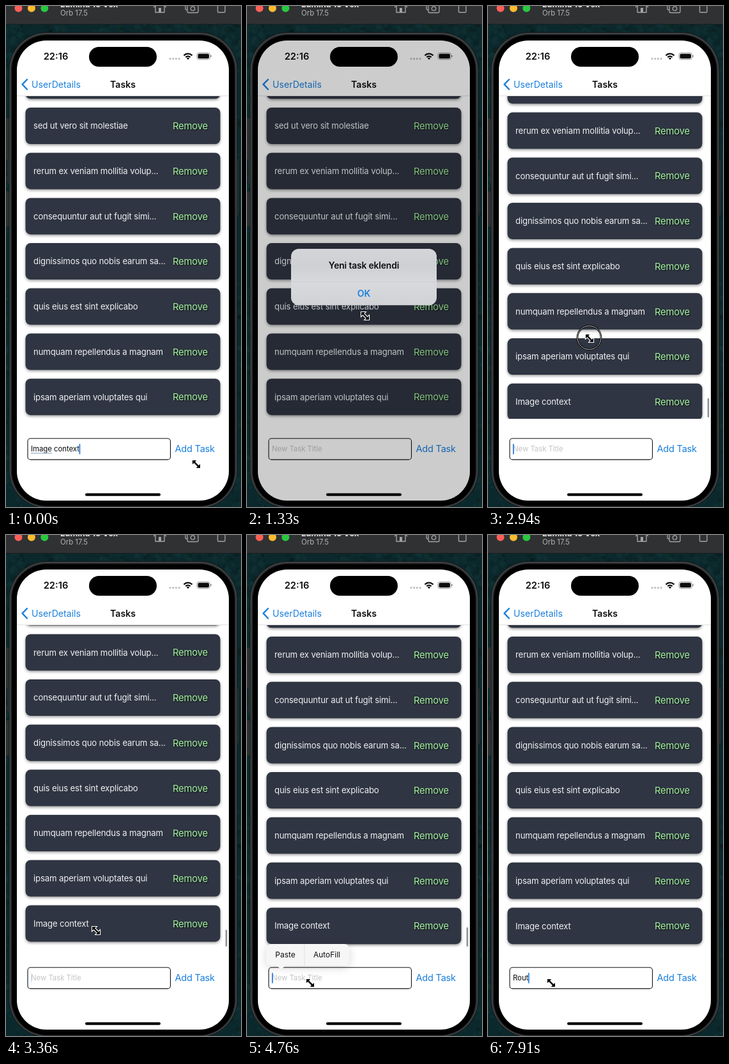
Animation of 368x784 px, one loop 8 s. Source, as an HTML page with a canvas:

```html
<!DOCTYPE html>
<html lang="en">
<head>
<meta charset="utf-8">
<title>Task list</title>
<style>
html, body { margin: 0; width: 100%; height: 100%; overflow: hidden; background: #0d2a2e; }
canvas { display: block; width: 368px; height: 784px; }
</style>
</head>
<body>
<canvas id="stage"></canvas>
<script>
const W = 368, H = 784, LOOP = 8000;
const PITCH = 70.7, LIST_TOP = 141, LIST_END = 646;
const BLUE = '#1a7fdc', INK = '#0c0d0f';
const TASKS = ['sed ut vero sit molestiae', 'rerum ex veniam mollitia volup...',
  'consequuntur aut ut fugit simi...', 'dignissimos quo nobis earum sa...',
  'quis eius est sint explicabo', 'numquam repellendus a magnam',
  'ipsam aperiam voluptates qui', 'Image context'];

// time, x, y
const POINTER = [[0, 298, 717], [300, 297, 700], [860, 297, 699], [1330, 185, 485],
  [1600, 183, 457], [2100, 183, 457], [2520, 166, 586], [2600, 165, 586], [2940, 159, 520],
  [3010, 158, 512], [3360, 141, 619], [3900, 111, 711], [4200, 111, 711], [4340, 99, 701]];

const canvas = document.getElementById('stage');
const dpr = window.devicePixelRatio || 1;
canvas.width = W * dpr;
canvas.height = H * dpr;
let ctx = canvas.getContext('2d');

const clamp = v => Math.max(0, Math.min(1, v));
const lerp = (a, b, k) => a + (b - a) * k;
const smooth = k => k * k * (3 - 2 * k);
const ramp = (t, from, to) => smooth(clamp((t - from) / (to - from)));
const pulse = (t, a, b, c, d) => ramp(t, a, b) * (1 - ramp(t, c, d));

function box(x, y, w, h, r, fill) {
  ctx.beginPath();
  ctx.roundRect(x, y, w, h, r);
  if (fill) {
    ctx.fillStyle = fill;
    ctx.fill();
  }
}

function disc(x, y, r, fill) {
  ctx.beginPath();
  ctx.arc(x, y, r, 0, 7);
  ctx.fillStyle = fill;
  ctx.fill();
}

function shape(points, close) {
  ctx.beginPath();
  points.forEach(([x, y]) => ctx.lineTo(x, y));
  if (close) ctx.closePath();
}

function stroke(color, width) {
  ctx.strokeStyle = color;
  ctx.lineWidth = width;
  ctx.stroke();
}

function text(s, x, y, size, color, { weight = 400, gap = 0, align = 'left' } = {}) {
  ctx.font = `${weight} ${size}px Inter, Roboto, sans-serif`;
  ctx.letterSpacing = gap + 'px';
  ctx.textAlign = align;
  ctx.fillStyle = color;
  ctx.fillText(s, x, y);
}

function shadow(color, blur, dx, dy) {
  ctx.shadowColor = color;
  ctx.shadowBlur = blur * dpr;
  ctx.shadowOffsetX = dx * dpr;
  ctx.shadowOffsetY = dy * dpr;
}

function layer(alpha, draw) {
  if (alpha <= 0) return;
  ctx.save();
  ctx.globalAlpha = alpha;
  draw();
  ctx.restore();
}

function random(seed) {
  return () => (seed = (seed * 16807) % 2147483647) / 2147483647;
}

function forest() {
  ctx.fillStyle = '#0b292d';
  ctx.fillRect(0, 0, W, H);
  const rnd = random(71);
  for (let i = 0; i < 900; i++) {
    const edge = i % 3;
    const x = edge ? (edge === 1 ? rnd() * 30 : W - rnd() * 30) : rnd() * W;
    const y = edge ? 28 + rnd() * 756 : 28 + rnd() * 40;
    const l = 6 + rnd() * 11;
    disc(x, y, 1.5 + rnd() * 4, `hsla(${170 + rnd() * 20}, 50%, ${l}%, .4)`);
  }
  ctx.fillStyle = 'rgba(58,52,47,.7)';
  ctx.fillRect(0, 176, 5, 64);
  ctx.fillRect(0, 290, 5, 55);
}

function toolbar() {
  ctx.fillStyle = '#303133';
  ctx.fillRect(0, 0, W, 28);
  ctx.fillStyle = '#1b1e1f';
  ctx.fillRect(0, 28, W, 1);
  ['#fe5f57', '#febc2e', '#28c840'].forEach((c, i) => disc(19.5 + i * 20.4, 3.5, 6, c));
  text('Lumina 15 Vex', 85, 2, 13, '#e6e6e6', { weight: 700 });
  text('Orb 17.5', 85, 15.3, 11.4, '#b2b3b4');
  const c = '#a3a4a5';
  ctx.lineJoin = 'round';
  shape([[231, 2], [241, -7], [251, 2]]);
  stroke(c, 1.4);
  shape([[234, 0], [234, 10], [248, 10], [248, 0]]);
  stroke(c, 1.4);
  box(239, 3, 4, 7, 0, c);
  box(281, -7, 15, 13, 2);
  stroke(c, 1.3);
  box(284, -3, 17, 13.5, 2, '#303133');
  stroke(c, 1.3);
  ctx.beginPath();
  ctx.arc(292.5, 4, 3.2, 0, 7);
  stroke(c, 1.3);
  box(331.5, -5, 11.5, 15, 1.5);
  stroke(c, 1.4);
}

function shell() {
  const button = '#2f3234';
  box(2.5, 176, 4, 25, 1, button);
  box(2.5, 226, 4, 52, 1, button);
  box(2.5, 292, 4, 52, 1, button);
  box(360, 240, 4, 88, 1, button);
  box(4.5, 41, 358, 745, 59, '#141617');
  box(5.5, 42, 356, 743, 58, '#404244');
  box(7.5, 44, 352, 739.5, 56, '#222426');
  box(9, 45.5, 349, 737, 55, '#000');
}

// Everything behind the app is drawn once.
const backdrop = document.createElement('canvas');
backdrop.width = canvas.width;
backdrop.height = canvas.height;
{
  const main = ctx;
  ctx = backdrop.getContext('2d');
  ctx.scale(dpr, dpr);
  forest();
  toolbar();
  shell();
  ctx = main;
}

function statusBar() {
  text('22:16', 78, 84, 14.7, INK, { weight: 600, align: 'center' });
  for (let i = 0; i < 4; i++) disc(257 + i * 4.7, 82.6, 1.5, '#b9babc');
  ctx.lineCap = 'butt';
  for (const r of [4.9, 8.9]) {
    ctx.beginPath();
    ctx.arc(285, 83.6, r, -Math.PI * 0.76, -Math.PI * 0.24);
    stroke(INK, 2.3);
  }
  ctx.beginPath();
  ctx.moveTo(285, 84);
  ctx.arc(285, 84, 3, -Math.PI * 0.76, -Math.PI * 0.24);
  ctx.fillStyle = INK;
  ctx.fill();
  box(299, 73.3, 20.5, 10.4, 3.2);
  stroke('#8b8c8e', 0.9);
  box(300.5, 74.8, 17.5, 7.4, 2, INK);
  box(320.4, 76.7, 1.3, 3.6, 0.7, '#8b8c8e');
}

function navBar() {
  shape([[33, 115], [25.5, 122.7], [33, 130.5]]);
  ctx.lineCap = ctx.lineJoin = 'round';
  stroke(BLUE, 2.4);
  text('UserDetails', 40, 127.8, 14.1, BLUE);
  text('Tasks', 183, 127.6, 14.1, INK, { weight: 600, align: 'center' });
  ctx.fillStyle = '#c9cacc';
  ctx.fillRect(17, 140.5, 332, 0.6);
}

function scrollAt(t) {
  if (t < 2590) return 0;
  if (t < 2940) return 63 * smooth((t - 2590) / 350 * 0.8) / smooth(0.8);
  if (t < 3150) return lerp(63, 80, Math.sin((t - 2940) / 210 * Math.PI / 2));
  const x = (t - 3150) / 105;
  return PITCH + 9.3 * (1 + x) * Math.exp(-x);
}

function list(t) {
  const off = scrollAt(t);
  ctx.save();
  ctx.beginPath();
  ctx.rect(17, LIST_TOP, 332, LIST_END - LIST_TOP);
  ctx.clip();
  for (let i = -1; i < TASKS.length; i++) {
    const y = 159 + i * PITCH - off;
    if (y > LIST_END || y < LIST_TOP - 62) continue;
    shadow('rgba(0,0,0,.42)', 4, 0, 1.8);
    box(30.5, y, 305, 57, 8, '#2f3542');
    shadow('transparent', 0, 0, 0);
    if (i < 0) continue;
    text(TASKS[i], 43, y + 33.3, 13.2, '#eff0f3', { gap: -0.15 });
    shadow('rgba(0,0,0,.75)', 2, 1, 1);
    text('Remove', 261, y + 34.2, 14.8, '#a4f4a0', { gap: -0.2 });
    shadow('transparent', 0, 0, 0);
  }
  layer(pulse(t, 2590, 2700, 4800, 5040), () => {
    const top = 614 + (Math.min(off, PITCH) - PITCH) * 0.03;
    const squash = Math.max(0, off - PITCH);
    box(343.7, top + squash, 2.6, 30 - squash, 1.3, '#8f9092');
  });
  ctx.restore();
}

function fieldText(t) {
  if (t < 400) return 'Image context';
  return 'Rout'.slice(0, [7070, 7420, 7630, 7910].filter(s => t >= s).length);
}

function caretAt(t) {
  if (t < 400) return 1;
  if (t < 2250) return 0;
  if (t < 4550) return ramp(t, 2250, 2350) - ramp(t, 3210, 3410) + ramp(t, 3850, 3990) - ramp(t, 4260, 4400);
  return 1 - ramp(t, 5200, 5400) + ramp(t, 5910, 6100) - ramp(t, 6250, 6450) + ramp(t, 6960, 7070);
}

function entry(t) {
  box(34, 676.7, 223.5, 33.2, 4.5, '#fff');
  stroke('#111214', 1.1);
  const typed = fieldText(t);
  const style = { gap: -0.07 };
  if (typed) text(typed, 39, 697.4, 11.45, INK, style);
  else text('New Task Title', 39, 697.4, 11.45, '#c3c4c7', style);
  const end = typed ? 39 + ctx.measureText(typed).width : 39.3;
  if (t < 400) {
    ctx.fillStyle = '#7d9dc4';
    ctx.fillRect(39, 699.3, ctx.measureText('Image').width, 1);
  }
  layer(clamp(caretAt(t)), () => box(end - 0.4, 685, 1.8, 16.6, 0.9, '#2b7fdd'));
  layer(1 - 0.75 * pulse(t, 290, 340, 420, 600), () =>
    text('Add Task', 264.5, 698.4, 14.6, BLUE, { gap: -0.25 }));
}

function menu(t) {
  layer(pulse(t, 4530, 4690, 7070, 7290), () => {
    const bg = '#f6f6f7';
    shadow('rgba(0,0,0,.16)', 14, 0, 3);
    box(30, 640, 130.5, 34, 8, bg);
    shadow('transparent', 0, 0, 0);
    shape([[46, 673.5], [60.5, 673.5], [53.5, 680]], true);
    ctx.fillStyle = bg;
    ctx.fill();
    ctx.fillStyle = '#dcdcdf';
    ctx.fillRect(89.6, 640, 0.8, 34);
    text('Paste', 60, 661.2, 11.9, INK, { align: 'center' });
    text('AutoFill', 125, 661.2, 11.9, INK, { align: 'center' });
  });
}

function alertBox(t) {
  const k = pulse(t, 420, 820, 1830, 2230);
  if (!k) return;
  ctx.fillStyle = `rgba(0,0,0,${0.2 * k})`;
  ctx.fillRect(17, 54, 332, 720);
  layer(Math.pow(k, 0.55), () => {
    const size = t < 1000 ? lerp(1.15, 1, k) : 1;
    ctx.translate(183, 424);
    ctx.scale(size, size);
    ctx.translate(-183, -424);
    const tone = d => {
      const v = 128 + 84 * k + d;
      return `rgb(${v},${v + 1},${v + 5})`;
    };
    const g = ctx.createLinearGradient(0, 380, 0, 468);
    [[0, 0], [0.3, -5], [0.62, 4], [1, -3]].forEach(([p, d]) => g.addColorStop(p, tone(d)));
    box(69, 380, 228, 88.3, 12, g);
    ctx.fillStyle = 'rgba(60,60,70,.08)';
    ctx.fillRect(69, 431, 228, 0.6);
    text('Yeni task eklendi', 183, 410.6, 13.8, INK, { weight: 600, gap: -0.12, align: 'center' });
    text('OK', 183, 455.2, 14, BLUE, { weight: 600, align: 'center' });
  });
}

function pointer(t) {
  let n = POINTER.findIndex(p => p[0] > t);
  if (n < 0) n = POINTER.length - 1;
  const [t0, x0, y0] = POINTER[n - 1], [t1, x1, y1] = POINTER[n];
  const k = ramp(t, t0, t1);
  ctx.save();
  ctx.translate(lerp(x0, x1, k), lerp(y0, y1, k));
  if (t > 2570 && t < 3020) {
    ctx.beginPath();
    ctx.arc(-0.5, -1, 18.5, 0, 7);
    stroke('#000', 2.8);
    stroke('#d8d8da', 0.9);
  }
  const arrow = [[-6, -6], [0.2, -6], [-1.9, -3.7], [3.7, 1.9], [6, -0.2],
    [6, 6], [-0.2, 6], [1.9, 3.7], [-3.7, -1.9], [-6, 0.2]];
  shape(arrow, true);
  ctx.lineJoin = 'miter';
  stroke('#fff', 2.2);
  ctx.fillStyle = '#000';
  ctx.fill();
  ctx.restore();
}

function render(t) {
  ctx.setTransform(1, 0, 0, 1, 0, 0);
  ctx.drawImage(backdrop, 0, 0);
  ctx.scale(dpr, dpr);
  ctx.save();
  box(17, 54, 332, 720, 46, '#fff');
  ctx.clip();
  statusBar();
  navBar();
  list(t);
  entry(t);
  menu(t);
  alertBox(t);
  box(130, 64, 106, 31, 15.5, '#000');
  box(124, 762.6, 118, 4.2, 2.1, '#000');
  ctx.restore();
  pointer(t);
}

const start = performance.now();
function tick() {
  render((performance.now() - start) % LOOP);
  requestAnimationFrame(tick);
}
tick();
</script>
</body>
</html>
```
